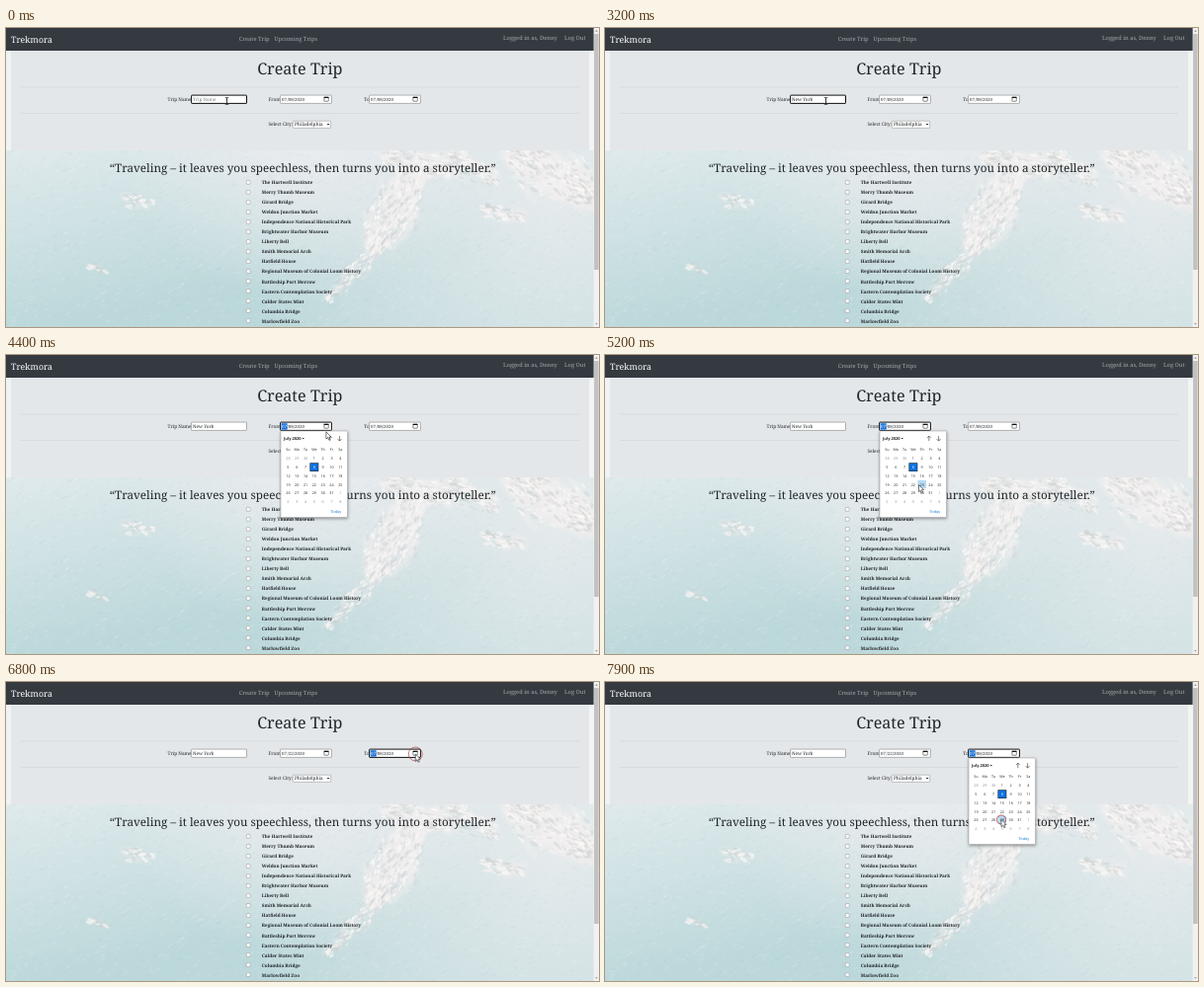
These frames come from a looping animation (600x303 px, 8 s). An HTML page with a canvas:

```html
<!DOCTYPE html>
<html lang="en">
<head>
<meta charset="utf-8">
<title>Create Trip</title>
<style>
html, body { margin: 0; width: 100%; height: 100%; overflow: hidden; background: #dfe6e8; }
canvas { display: block; width: 600px; height: 303px; }
</style>
</head>
<body>
<canvas id="stage" width="600" height="303"></canvas>
<script>
const W = 600, H = 303, LOOP = 8000;
const SERIF = '"Noto Serif", serif', SANS = '"Open Sans", sans-serif';
const INK = '#212529';
const PLACES = [
  'The Hartwell Institute', 'Merry Thumb Museum', 'Girard Bridge', 'Weldon Junction Market',
  'Independence National Historical Park', 'Brightwater Harbor Museum', 'Liberty Bell',
  'Smith Memorial Arch', 'Hatfield House', 'Regional Museum of Colonial Loom History',
  'Battleship Port Merrow', 'Eastern Contemplation Society', 'Calder States Mint',
  'Columbia Bridge', 'Marlowfield Zoo'
];
const ctx = document.getElementById('stage').getContext('2d');
let c = ctx;

function rect(x, y, w, h, fill) {
  c.fillStyle = fill;
  c.fillRect(x, y, w, h);
}

function text(s, x, y, size, { fill = INK, font = SERIF, weight = 400, align = 'left' } = {}) {
  c.font = `${weight} ${size}px ${font}`;
  c.textAlign = align;
  c.fillStyle = fill;
  c.fillText(s, x, y);
}

function line(pts, stroke, width) {
  c.beginPath();
  pts.forEach(([x, y]) => c.lineTo(x, y));
  c.strokeStyle = stroke;
  c.lineWidth = width;
  c.stroke();
}

// Small filled triangle, pointing down for dir 1 and up for dir -1
function caret(x, y, r, dir, fill) {
  c.beginPath();
  c.moveTo(x - r, y - dir * r / 2);
  c.lineTo(x + r, y - dir * r / 2);
  c.lineTo(x, y + dir * r / 2);
  c.fillStyle = fill;
  c.fill();
}

function frame(x, y, w, h, stroke, width, fill) {
  c.beginPath();
  c.roundRect(x, y, w, h, 0.5);
  if (fill) { c.fillStyle = fill; c.fill(); }
  c.strokeStyle = stroke;
  c.lineWidth = width;
  c.stroke();
}

function layer(draw) {
  const cv = document.createElement('canvas');
  cv.width = W;
  cv.height = H;
  c = cv.getContext('2d');
  c.textRendering = 'geometricPrecision';
  draw();
  c = ctx;
  return cv;
}

// ---- backdrop: pale sea with rocks ----
let seed = 7;
const rnd = () => (seed = (seed * 16807) % 2147483647) / 2147483647;

function blob(x, y, rx, ry, turn, fill) {
  c.fillStyle = fill;
  c.beginPath();
  c.ellipse(x, y, rx, ry, turn, 0, 7);
  c.fill();
}

// Crags scattered along a spine, thinning towards both ends
function ridge(x0, y0, x1, y1, r) {
  const len = Math.hypot(x1 - x0, y1 - y0), turn = Math.atan2(y1 - y0, x1 - x0);
  const scatter = (n, size, fills) => {
    for (let i = 0; i < n; i++) {
      const u = rnd(), w = r * (0.35 + 0.65 * Math.sin(u * Math.PI));
      const x = x0 + (x1 - x0) * u + (rnd() - 0.5) * 2 * w;
      const y = y0 + (y1 - y0) * u + (rnd() - 0.5) * 1.4 * w;
      blob(x, y, size * (0.5 + rnd()), size * (0.2 + rnd() * 0.4), turn + rnd() - 0.5, fills[i % fills.length]);
    }
  };
  c.filter = 'blur(2px)';
  scatter(len * r / 22, r * 0.4, ['#f0eeee88', '#f4f2f288']);
  c.filter = 'blur(0.5px)';
  scatter(len * r / 9, 3, ['#fbf9f8aa', '#d3d2d166', '#f6f3f2aa', '#c6cbcc55']);
}

function glow(x, y, r, color) {
  const g = c.createRadialGradient(x, y, 0, x, y, r);
  g.addColorStop(0, color);
  g.addColorStop(1, color.slice(0, 7) + '00');
  rect(0, 0, W, H, g);
}

function sea() {
  const g = c.createLinearGradient(0, 90, 40, H);
  g.addColorStop(0, '#e6edef');
  g.addColorStop(1, '#bcd8da');
  rect(0, 0, W, H, g);
  glow(560, 170, 330, '#efeff1cc');
  glow(300, 90, 190, '#f1eef1cc');
  c.filter = 'blur(0.4px)';
  for (let i = 0; i < 2200; i++) {
    blob(rnd() * W, 120 + rnd() * 185, 1 + rnd() * 2.5, 0.5, -0.5, i % 2 ? '#ffffff30' : '#9fc0c51c');
  }
  ridge(122, 172, 146, 180, 10);
  ridge(84, 242, 100, 246, 7);
  ridge(385, 128, 450, 146, 18);
  ridge(412, 150, 372, 222, 24);
  ridge(384, 212, 326, 276, 10);
  ridge(450, 128, 494, 156, 15);
  ridge(484, 182, 522, 192, 12);
  ridge(515, 125, 595, 172, 28);
  c.filter = 'none';
}

// ---- page parts that never change ----
function page() {
  sea();
  rect(0, 22, 5, 102, '#eff3f4');
  rect(590, 22, 5, 102, '#f4f4f5');
  rect(5, 22, 585, 102, '#e4e7ea');
  rect(0, 0, 595, 23, '#343a40');
  text('Trekmora', 5, 14.6, 8.9, { fill: '#fff', weight: 500 });
  const nav = { fill: '#a5a8ab' };
  text('Create Trip', 235.8, 13.2, 5.75, nav);
  text('Upcoming Trips', 271.5, 13.2, 5.75, nav);
  text('Logged in as, Denny', 503, 12.1, 5.75, nav);
  text('Log Out', 565, 12.1, 5.75, nav);

  text('Create Trip', 297.3, 46.8, 16.15, { align: 'center' });
  rect(15, 59.7, 565, 0.6, '#00000018');
  rect(15, 86, 565, 0.6, '#00000018');
  text('Trip Name', 163.5, 74, 4.75);
  text('From', 265.5, 74, 4.75);
  text('To', 362.3, 74, 4.75);
  text('Select City:', 265.5, 99.4, 4.75);
  frame(290.3, 94.2, 38.4, 7.2, '#888', 0.5, '#fff');
  text('Philadelphia', 292, 99.4, 4.75);
  caret(326, 97.8, 1.5, 1, '#222');

  text('“Traveling – it leaves you speechless, then turns you into a storyteller.”',
    300.3, 145.5, 11.68, { align: 'center' });
  PLACES.forEach((name, i) => {
    const y = 156.5 + i * 10.02;
    frame(243.3, y - 2, 3.8, 3.8, '#909090', 0.5, '#fff');
    text(name, 258.8, y + 1.8, 4.58, { weight: 600 });
  });

  rect(594.6, 0, 5.4, H, '#f1f1f1');
  rect(595.1, 6, 4.5, 239, '#c1c1c1');
  caret(597.4, 2.9, 1.2, -1, '#555');
  caret(597.4, 300, 1.2, 1, '#555');
}

// ---- form fields ----
function field(x, w, focused) {
  frame(x, 68.1, w, 8.3, focused ? '#101010' : '#808080', focused ? 1 : 0.6, '#fff');
}

function dateField(x, day, focused) {
  field(x, 51.8, focused);
  if (focused) rect(x + 1, 69.2, 6, 6.4, '#1a74dc');
  text('07', x + 1.4, 74, 4.4, { fill: focused ? '#fff' : INK });
  text(`/${day}/2020`, x + 7, 74, 4.4);
  frame(x + 44.3, 70.2, 4.4, 4, '#111', 0.5);
  rect(x + 44.1, 69.8, 4.8, 1.2, '#111');
}

// ---- date picker ----
const COLS = 8.82, ROWS = 8.75;

function arrow(x, y, dir) {
  line([[x, y - 2.5], [x, y + 2.5]], '#333', 0.6);
  line([[x - 2, y + dir * 0.5], [x, y + dir * 2.5], [x + 2, y + dir * 0.5]], '#333', 0.6);
}

function picker(x, mx, my) {
  c.save();
  c.shadowColor = '#0006';
  c.shadowBlur = 3;
  c.shadowOffsetY = 1;
  rect(x, 77, 67.5, 87.5, '#fff');
  c.restore();
  frame(x, 77, 67.5, 87.5, '#aaa', 0.6);
  const opt = { font: SANS, align: 'center' };
  text('July 2020', x + 3, 85.9, 4, { font: SANS, weight: 700 });
  caret(x + 22.7, 84.6, 1.3, 1, '#222');
  arrow(x + 49.8, 84.6, -1);
  arrow(x + 59.6, 84.6, 1);

  const cx = i => x + 7.4 + i * COLS, cy = j => 104.9 + j * ROWS;
  ['Su', 'Mo', 'Tu', 'We', 'Th', 'Fr', 'Sa'].forEach((d, i) => text(d, cx(i), 97.4, 3.7, opt));
  const hi = Math.round((mx - cx(0)) / COLS), hj = Math.round((my - cy(0)) / ROWS);
  for (let k = 0; k < 42; k++) {
    const i = k % 7, j = Math.floor(k / 7), n = k - 2;
    const inside = n > 0 && n < 32, picked = n === 8;
    if (picked) {
      rect(cx(i) - 4.4, cy(j) - 4.3, 8.8, 8.6, '#101010');
      rect(cx(i) - 3.9, cy(j) - 3.8, 7.8, 7.6, '#0b72e0');
    } else if (i === hi && j === hj) {
      rect(cx(i) - 4.3, cy(j) - 4.2, 8.6, 8.4, '#b5dcf3');
    }
    const label = n < 1 ? n + 30 : n > 31 ? n - 31 : n;
    text(label, cx(i), cy(j) + 1.5, 3.75,
      { ...opt, fill: picked ? '#fff' : inside ? '#222' : '#8b8b8b' });
  }
  text('Today', x + 55.8, 159.6, 3.9, { ...opt, fill: '#1672cf' });
}

// ---- pointer ----
const HOME = [223.5, 74];
const MOVES = [
  { from: 3200, to: 3800, at: [324.5, 73] },
  { from: 4250, to: 5100, at: [317.5, 131.5] },
  { from: 5250, to: 5450, at: [312.3, 131.5] },
  { from: 5880, to: 6650, at: [414.3, 73] },
  { from: 7050, to: 7800, at: [401, 139.5] }
];
const CLICKS = [3940, 5480, 6680, 7855];

function pointerAt(t) {
  let [x, y] = HOME;
  for (const { from, to, at } of MOVES) {
    const u = Math.min(1, Math.max(0, (t - from) / (to - from))), e = u * u * (3 - 2 * u);
    x += (at[0] - x) * e;
    y += (at[1] - y) * e;
  }
  return [x, y];
}

function pointer(x, y) {
  const overText = y > 68 && y < 77 && ((x > 187 && x < 244) || (x > 278 && x < 304));
  if (overText) {
    line([[x, y - 3.2], [x, y + 3.2]], '#222', 0.9);
    for (const d of [-3.4, 3.4]) line([[x - 1.8, y + d], [x + 1.8, y + d]], '#222', 0.7);
    return;
  }
  c.beginPath();
  for (const [a, b] of [[0, 0], [0, 7.2], [1.7, 5.7], [2.8, 8.2], [4, 7.7], [2.9, 5.2], [5.1, 5.1]]) {
    c.lineTo(x + a, y + b);
  }
  c.closePath();
  c.fillStyle = '#fff';
  c.fill();
  c.strokeStyle = '#222';
  c.lineWidth = 0.6;
  c.stroke();
}

function ring(t, x, y) {
  const start = CLICKS.find(s => t >= s && t < s + 240);
  if (start === undefined) return;
  const age = t - start;
  c.beginPath();
  c.arc(x, y, 3 + age * 0.033, 0, 7);
  c.strokeStyle = `rgba(176,48,48,${1 - age / 400})`;
  c.lineWidth = 0.9;
  c.stroke();
}

// ---- typing: one time per key ----
const NAME = 'New York';
const KEYS = [700, 1400, 1400, 1500, 1500, 1700, 2200, 2400];
const BLINK = 550;

function nameField(t, focused) {
  field(187.6, 55.9, focused);
  const count = KEYS.filter(k => t >= k).length;
  const typed = NAME.slice(0, count), last = count ? KEYS[count - 1] : -BLINK;
  text(typed || 'Trip Name', 188.9, 74, 4.65, { fill: typed ? INK : '#7b8086' });
  if (focused && (t - last) % (2 * BLINK) < BLINK) {
    rect(189.1 + c.measureText(typed).width, 69.6, 0.5, 5.4, '#111');
  }
}

ctx.textRendering = 'geometricPrecision';
const base = layer(page);

function draw(t) {
  const [x, y] = pointerAt(t);
  c.drawImage(base, 0, 0);
  nameField(t, t < 3950);
  dateField(277.6, t < 5600 ? '08' : '22', t >= 3950 && t < 6750);
  dateField(367.6, '08', t >= 6750);
  if (t >= 4150 && t < 5600) picker(278, x, y);
  if (t >= 6980) picker(368, x, y);
  ring(t, x, y);
  pointer(x, y);
}

function tick() {
  draw(performance.now() % LOOP);
  requestAnimationFrame(tick);
}
tick();
</script>
</body>
</html>
```
